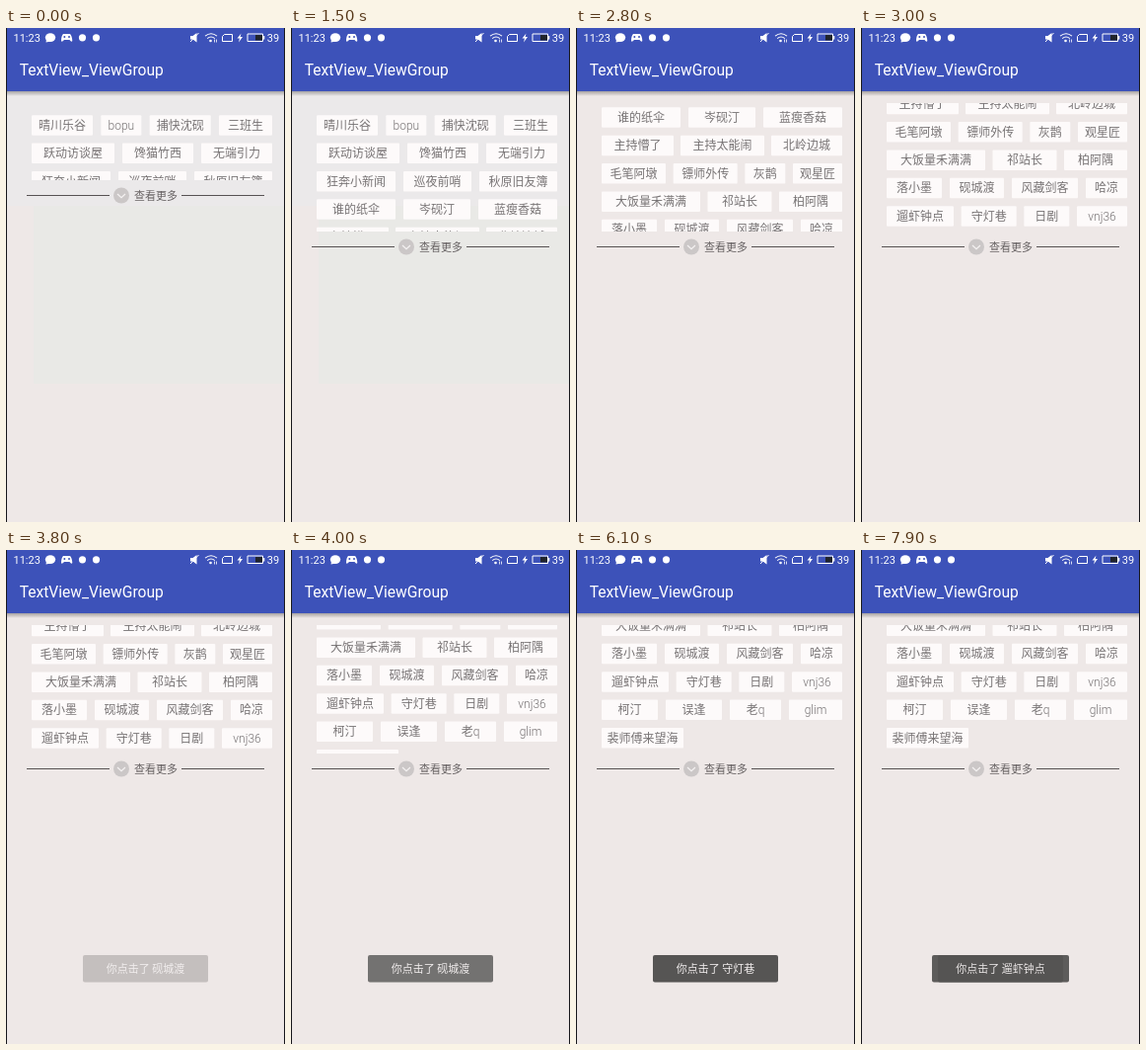
An HTML page with a canvas for the animation above (8000 ms loop, 283 by 500 pixels).

```html
<!DOCTYPE html>
<html lang="zh-CN">
<head>
<meta charset="utf-8">
<title>TextView_ViewGroup</title>
<style>
  html, body { margin: 0; width: 100%; height: 100%; overflow: hidden; background: #eee8e7; }
  canvas { display: block; width: 283px; height: 500px; }
</style>
</head>
<body>
<canvas id="stage"></canvas>
<script>
const W = 283, H = 500, LOOP = 8000, STEP = 100;
const FONT = 'Roboto, "Noto Sans CJK SC", "Noto Sans CJK", sans-serif';
const canvas = document.getElementById('stage');
const ctx = canvas.getContext('2d');
const ratio = window.devicePixelRatio || 1;
canvas.width = W * ratio;
canvas.height = H * ratio;
ctx.scale(ratio, ratio);

// Each row: labels, then the width of each tag; gaps fill the row.
const ROWS = [
  ['晴川乐谷 bopu 捕快沈砚 三班生', [62, 41, 62, 54]],
  ['跃动访谈屋 馋猫竹西 无端引力', [84, 72, 72]],
  ['狂奔小新闻 巡夜前哨 秋原旧友簿', [80, 69, 79]],
  ['谁的纸伞 岑砚汀 蓝瘦香菇', [80, 68, 80]],
  ['主持懵了 主持太能闹 北岭边城', [73, 85, 72]],
  ['毛笔阿墩 镖师外传 灰鹊 观星匠', [65, 65, 41, 50]],
  ['大饭量禾满满 祁站长 柏阿隅', [100, 65, 64]],
  ['落小墨 砚城渡 风藏剑客 哈凉', [56, 55, 67, 42]],
  ['遛虾钟点 守灯巷 日剧 vnj36', [68, 56, 46, 51]],
  ['柯汀 误逢 老q glim', [57, 57, 52, 54]],
  ['裴师傅来望海', [83]],
].map(([labels, widths]) => ({ labels: labels.split(' '), widths }));

const LEFT = 26, ROW_WIDTH = 244, FIRST_ROW = 88.2, PITCH = 28.37, TAG_H = 20.5;
const LIST_TOP = 76, HEADER_H = 64;
const SCROLL = [[2400, 0], [2500, 9], [2800, 93], [3000, 135], [3800, 135],
                [3900, 151], [4000, 170], [4100, 185], [4200, 192]];
const TOAST_IN = [[3600, 0], [3700, 0.1], [3800, 0.28], [3900, 0.6], [4100, 1]];
const SECOND_TOAST = [[5500, 0], [6100, 1]];
const THIRD_TOAST = [[7500, 0], [7600, 0.25], [7700, 0.55], [7900, 0.95]];

function track(keys, t) {
  if (t <= keys[0][0]) return keys[0][1];
  for (let i = 1; i < keys.length; i++) {
    const [t0, a] = keys[i - 1], [t1, b] = keys[i];
    if (t <= t1) return a + (b - a) * (t - t0) / (t1 - t0);
  }
  return keys[keys.length - 1][1];
}

function rect(x, y, w, h, color, radius = 0) {
  ctx.fillStyle = color;
  ctx.beginPath();
  ctx.roundRect(x, y, w, h, radius);
  ctx.fill();
}

function circle(x, y, r, color) {
  ctx.fillStyle = color;
  ctx.beginPath();
  ctx.arc(x, y, r, 0, Math.PI * 2);
  ctx.fill();
}

function line(path, color = '#fff', width = 1) {
  ctx.strokeStyle = color;
  ctx.lineWidth = width;
  ctx.stroke(new Path2D(path));
}

function text(value, x, y, size, color, align = 'left', weight = 400) {
  ctx.font = `${weight} ${size}px ${FONT}`;
  ctx.textAlign = align;
  ctx.fillStyle = color;
  ctx.fillText(value, x, y);
}

function fill(path, color = '#fff') {
  ctx.fillStyle = color;
  ctx.fill(new Path2D(path));
}

function drawBackground(t) {
  rect(0, 0, W, H, '#eee8e7');
  if (t < 2500) {
    rect(0, HEADER_H, W, 116, '#ebe9ea');
    rect(28, 180, 254, 180, '#e9e9e6');
  }
  const shadow = ctx.createLinearGradient(0, HEADER_H - 1, 0, HEADER_H + 5);
  shadow.addColorStop(0, 'rgba(0,0,0,.36)');
  shadow.addColorStop(1, 'rgba(0,0,0,0)');
  rect(0, HEADER_H, W, 5, shadow);
}

function drawHeader() {
  rect(0, 0, W, HEADER_H, '#3d52b9');
  text('11:23', 7.5, 13.7, 11, '#fff');
  text('39', 264.8, 13.7, 11, '#fff');
  text('TextView_ViewGroup', 13.7, 47.7, 15.6, '#fff');

  // Message bubble and gamepad
  ctx.fillStyle = '#fff';
  ctx.beginPath();
  ctx.ellipse(45, 9.6, 5.2, 4.4, 0, 0, Math.PI * 2);
  ctx.fill();
  fill('M41 11L40.6 14.6L45 13.5Z');
  fill('M58 6H65Q67 8 67.3 13Q66.5 15 64.5 12H59Q56.5 15 56 13Q56 8 58 6Z');
  circle(59.3, 9, 1, '#3d52b9');
  circle(64, 9, 1, '#3d52b9');

  circle(77.5, 9.8, 3.6, '#fff');
  circle(91.5, 9.8, 3.6, '#fff');

  // Muted speaker
  fill('M187 8H189.5L193.5 5V14.5L189.5 11.5H187Z');
  line('M187 14L195.5 5');
  // Wi-Fi with activity mark
  line('M202 8.2Q208 3.2 214 8.2M204.2 10.6Q208 7.4 211.8 10.6', '#fff', 1.1);
  circle(207.5, 13, 1.3, '#fff');
  line('M211.5 11.5V14.5M213.5 11.5V14.5', '#fff', 0.8);
  // SIM, charging bolt, battery
  line('M221.5 6.5H229.5V13.5H219.5V8.5Z');
  fill('M238.5 5.5L234.5 10.5H237L236 14.5L240 9H237.6Z');
  line('M245 6H260.5V13.5H245Z');
  rect(253, 7, 7, 5.5, '#20242c');
  rect(261, 8, 1.3, 3.5, '#fff');
}

function drawTags(scroll, bottom) {
  ctx.save();
  ctx.beginPath();
  ctx.rect(0, LIST_TOP, W, bottom - LIST_TOP);
  ctx.clip();
  ROWS.forEach(({ labels, widths }, row) => {
    const y = FIRST_ROW + row * PITCH - scroll;
    const used = widths.reduce((sum, w) => sum + w, 0);
    const gap = (ROW_WIDTH - used) / Math.max(1, widths.length - 1);
    let x = LEFT;
    labels.forEach((label, i) => {
      rect(x, y, widths[i], TAG_H, '#fdfafa', 1);
      text(label, x + widths[i] / 2, y + 14.7, 12, '#777374', 'center', 300);
      x += widths[i] + gap;
    });
  });
  ctx.restore();
}

function drawMore(y) {
  line(`M21 ${y}H105M178 ${y}H262`, '#575253');
  circle(117, y, 8, '#cbc7c7');
  line(`M113 ${y - 1.5}L117 ${y + 2.2}L121 ${y - 1.5}`, '#f5f2f2', 1.2);
  text('查看更多', 130, y + 4, 11, '#676263', 'left', 300);
}

function toastBox(width, alpha) {
  ctx.globalAlpha = alpha;
  rect(141.5 - width / 2, 410, width, 27.5, '#565554', 2);
  ctx.globalAlpha = 1;
}

function toastText(name, alpha) {
  ctx.globalAlpha = alpha;
  text('你点击了 ' + name, 141.5, 428, 11, '#f2eeee', 'center');
  ctx.globalAlpha = 1;
}

function drawToasts(t) {
  const first = track(TOAST_IN, t);
  const second = track(SECOND_TOAST, t);
  const third = track(THIRD_TOAST, t);
  if (!first) return;
  toastBox(127, first);
  if (third) toastBox(139, third);
  // The lettering nearly equals the page colour, so it stays solid while its box fades in.
  toastText('砚城渡', 1 - second);
  toastText('守灯巷', second * Math.max(0, 1 - third * 1.06));
  toastText('遛虾钟点', third);
}

function draw(now) {
  const t = Math.floor(now % LOOP / STEP) * STEP;
  const expanded = t >= 1500;
  drawBackground(t);
  drawHeader();
  drawTags(track(SCROLL, t), expanded ? 206 : 154);
  drawMore(expanded ? 221.5 : 169.5);
  drawToasts(t);
  rect(0, 0, 1, H, '#17171c');
  rect(W - 1, 0, 1, H, '#17171c');
}

const start = performance.now();
function tick() {
  draw(performance.now() - start);
  requestAnimationFrame(tick);
}
tick();
</script>
</body>
</html>
```
